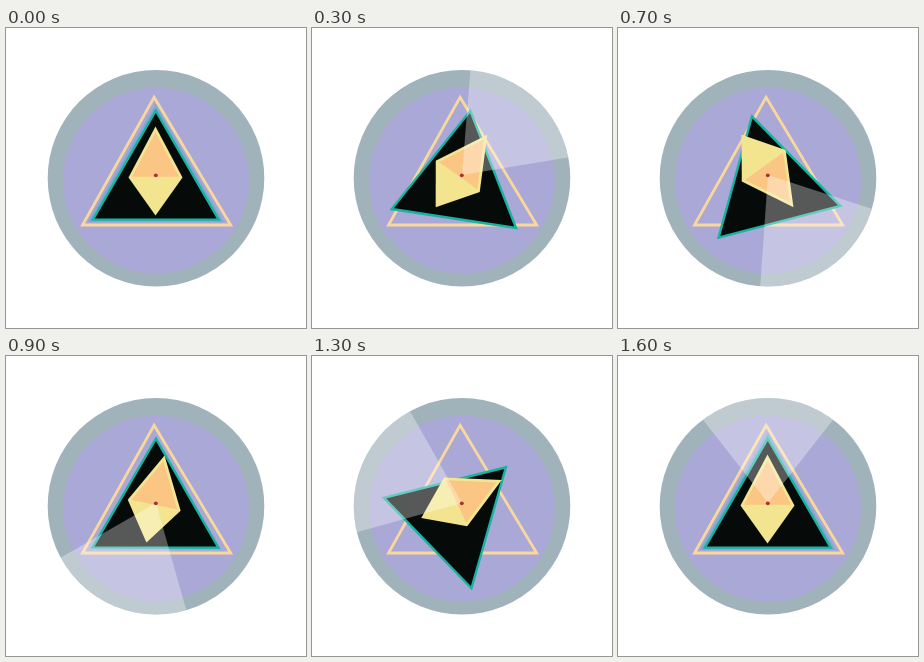
An HTML page that plays this animation: 300x300 px, repeating every 1700 ms.

```html
<!DOCTYPE html>
<html lang="en">
<head>
<meta charset="utf-8">
<title>Turning triangle</title>
<style>
  html, body { margin: 0; width: 100%; height: 100%; overflow: hidden; background: #fff; }
  svg { display: block; width: 100vw; height: 100vh; }
</style>
</head>
<body>
<svg viewBox="0 0 300 300">
  <circle cx="150" cy="150.2" r="108.3" fill="#a0b2ba"/>
  <circle cx="150" cy="152.5" r="93" fill="#a9a8d6"/>
  <path d="M148.1 69.3 224.7 197H76.5Z" fill="none" stroke="#fad89c" stroke-width="2.8"/>
  <path id="halo" d="M149.7 79 215.1 192.3H84.3Z" fill="none" stroke="#7fa9d0" stroke-width="3"/>
  <path id="triangle" d="M0-72.6 62.9 36.3H-62.9Z" fill="#060a09" stroke="#17b3a0" stroke-width="2.4"/>
  <g id="kite">
    <path d="M0-44.5 27 6.5 0 44.5-27 6.5Z" fill="#f3e58f"/>
    <path d="M0-38.5 23.5 5.8H-23.5Z" fill="#fbc584"/>
  </g>
  <clipPath id="disc"><circle cx="150" cy="150.2" r="108.3"/></clipPath>
  <g clip-path="url(#disc)">
    <path id="beam" d="M0 0-123.1-157.6H123.1Z" fill="#fff" opacity=".32"/>
  </g>
  <circle cx="149.8" cy="147.3" r="1.9" fill="#a8322c"/>
</svg>
<script>
const LOOP = 1700, STEP = 100, TURN = 8;
const part = id => document.getElementById(id);
const smooth = x => x * x * (3 - 2 * x);

function place(id, x, y, angle) {
  part(id).setAttribute('transform', `translate(${x} ${y}) rotate(${angle})`);
}

function draw(step) {
  const p = step % TURN / TURN;

  // The triangle turns by a third while its centre circles once the other way.
  const spin = 120 * smooth(p ** 1.84);
  const orbit = -(60 + 3 * spin) * Math.PI / 180;
  place('triangle', 147 + 5.5 * Math.cos(orbit), 160.1 + 5.5 * Math.sin(orbit), spin);

  // The kite turns steadily, then whips round.
  place('kite', 149.5, 143, 94 * p + 158 * p ** 7);

  // The beam makes one even sweep, lagging for a moment early on.
  const lag = 53 * Math.exp(-(((step - 4.65) / 1.9) ** 2));
  place('beam', 150, 147, 22.5 * step - lag);

  part('halo').style.display = p ? 'none' : '';
  part('beam').style.display = step ? '' : 'none';
}

const start = performance.now();
function tick() {
  draw(Math.floor((performance.now() - start) % LOOP / STEP));
  requestAnimationFrame(tick);
}
tick();
</script>
</body>
</html>
```
